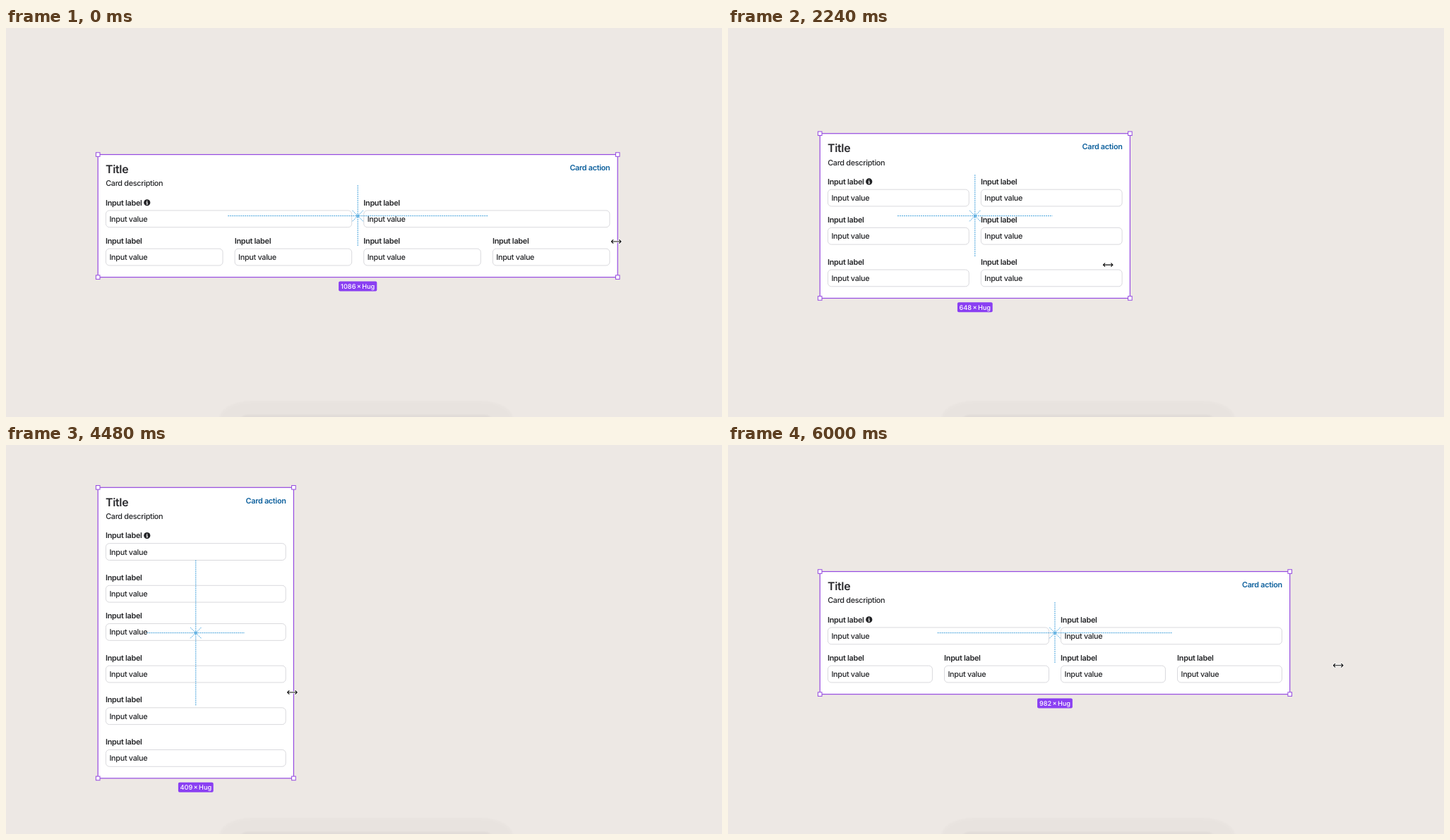
These frames come from a looping animation (1014x552 px, 6080 ms). An HTML page:

```html
<!DOCTYPE html>
<html lang="en">
<head>
<meta charset="utf-8">
<title>Responsive card resize</title>
<style>
  html, body { margin: 0; width: 100%; height: 100%; overflow: hidden; background: #ede8e4; }
  svg { display: block; width: 1014px; height: 552px; }
  text {
    font: 500 10.84px Inter, "Liberation Sans", sans-serif;
    letter-spacing: -.028em; fill: #242528;
    text-rendering: geometricPrecision;
  }
  .label { font-weight: 600; letter-spacing: -.026em; }
  .title { font-size: 15.9px; font-weight: 600; letter-spacing: -.022em; fill: #2a2a2e; }
  .action { font-weight: 600; letter-spacing: -.027em; text-anchor: end; fill: #0d609d; }
  .size { font-size: 9.2px; letter-spacing: 0; word-spacing: -.12em; text-anchor: middle; fill: #fff; }
  .input { fill: #fff; stroke: #d9d9dd; }
  .outline { fill: none; stroke: #9549e0; stroke-width: 1.2; }
  .handle { fill: #fff; stroke: #9549e0; }
  .guide { fill: none; stroke: #2f98d8; stroke-width: .9; stroke-dasharray: 2 1; }
  .arrow { fill: none; stroke-linejoin: round; stroke-linecap: round; }
</style>
</head>
<body>
<svg id="stage" viewBox="0 0 1014 552">
  <defs>
    <filter id="near" x="-10%" y="-50%" width="120%" height="200%"><feGaussianBlur stdDeviation="1.5"/></filter>
  </defs>
  <rect x="302" y="529" width="416" height="90" rx="46" ry="26" opacity=".014" filter="url(#near)"/>
  <rect x="330" y="549" width="360" height="60" rx="12" opacity=".03" filter="url(#near)"/>
</svg>
<script>
const LOOP = 6080, STEP = 80, LEAD = 110;
const WIDE = 1086, NARROW = 409;      // card widths in design units
const UNIT = 736 / WIDE;              // stage pixels per design unit
const LEFT = 130.2, MID_Y = 266.6;
const PAD = 16, GAP = 24, MIN_FIELD = 200;
const GROUPS = [2, 4];                // fields per group

// [time, card width] at the turning points of the drag
const DRAG = [[0, WIDE], [560, WIDE], [1360, 846], [2240, 648], [2480, 559], [3360, 454],
  [3760, NARROW], [4960, NARROW], [5520, 706], [6000, 982], [LOOP, WIDE]];

const stage = document.getElementById('stage');

function set(el, attrs) {
  for (const key in attrs) el.setAttribute(key, attrs[key]);
}

function add(parent, tag, attrs, text) {
  const el = document.createElementNS('http://www.w3.org/2000/svg', tag);
  set(el, attrs);
  if (text) el.textContent = text;
  return parent.appendChild(el);
}

function slope(i) {
  const [t0, w0] = DRAG[i], [t1, w1] = DRAG[i + 1];
  return (w1 - w0) / (t1 - t0);
}

function tangent(i) {
  if (i === 0) return 0;
  if (i === DRAG.length - 1) return slope(i - 1);
  const a = slope(i - 1), b = slope(i);
  return a * b <= 0 ? 0 : 2 * a * b / (a + b);
}

// Smooth curve through the drag points that never overshoots
function widthAt(t) {
  if (t >= LOOP) return WIDE;
  const i = DRAG.findIndex(([end]) => end > t) - 1;
  const [t0, w0] = DRAG[i], [t1, w1] = DRAG[i + 1];
  const span = t1 - t0, u = (t - t0) / span, r = 1 - u;
  return w0 * r * r * (1 + 2 * u) + w1 * u * u * (3 - 2 * u)
    + span * u * r * (tangent(i) * r - tangent(i + 1) * u);
}

const card = add(stage, 'g');
const paper = add(card, 'rect', { fill: '#fff' });
add(card, 'text', { class: 'title', x: 10.9, y: 26.5 }, 'Title');
add(card, 'text', { x: 11, y: 44.8 }, 'Card description');
const action = add(card, 'text', { class: 'action', y: 22.7 }, 'Card action');

const fields = Array.from({ length: 6 }, (_, i) => {
  const g = add(card, 'g');
  add(g, 'text', { class: 'label', y: -7.2 }, 'Input label');
  const box = add(g, 'rect', { class: 'input', x: .4, y: .2, height: 23.8, rx: 5 });
  add(g, 'text', { x: 5.4, y: 16.1 }, 'Input value');
  if (i === 0) {
    add(g, 'circle', { cx: 58.7, cy: -11, r: 4.6, fill: '#202124' });
    add(g, 'path', { d: 'M57.5 -11.4H58.9V-8.9M57.4 -8.8H60.1M58.7 -13.8V-12.6', fill: 'none', stroke: '#fff', 'stroke-width': 1.1 });
  }
  return { g, box };
});

const outline = add(card, 'rect', { class: 'outline' });
const axes = add(card, 'path', { class: 'guide' });
const star = add(card, 'g');
add(star, 'path', { class: 'guide', d: 'M-2 -2L-8 -8M2 -2L8 -8M-2 2L-8 8M2 2L8 8' });
add(star, 'rect', { x: -1.5, y: -1.5, width: 3, height: 3, fill: '#7bbce6', stroke: '#2f98d8', 'stroke-width': .6 });
const handles = [0, 1, 2, 3].map(() => add(card, 'rect', { class: 'handle', width: 5.6, height: 5.6 }));

const badge = add(card, 'g');
const badgeBox = add(badge, 'rect', { height: 14, rx: 2, fill: '#8a3ff2' });
const badgeText = add(badge, 'text', { class: 'size', y: 10.4 });

const cursor = add(stage, 'g');
const arrow = 'M-6.8 0H6.8M-4.4 -2.3L-6.8 0L-4.4 2.3M4.4 -2.3L6.8 0L4.4 2.3';
add(cursor, 'path', { class: 'arrow', d: arrow, stroke: '#fff', 'stroke-width': 2.8 });
add(cursor, 'path', { class: 'arrow', d: arrow, stroke: '#111', 'stroke-width': 1.1 });

const fits = (count, inner) => inner >= count * MIN_FIELD + (count - 1) * GAP;

// Wraps each group into as many columns as fit and returns the lower edge
function placeFields(inner) {
  let y = 79.2, n = 0;
  for (const count of GROUPS) {
    const cols = fits(4, inner) ? count : fits(2, inner) ? 2 : 1;
    const size = (inner - (cols - 1) * GAP) / cols;
    for (let k = 0; k < count; k++, n++) {
      const col = k % cols;
      if (n && !col) y += (k ? 88 : 80) * UNIT;
      set(fields[n].g, { transform: `translate(${(PAD + col * (size + GAP)) * UNIT} ${y})` });
      set(fields[n].box, { width: size * UNIT - .8 });
    }
    // A group stacked in one column keeps the wider gap inside
  }
  return y + 60 * UNIT;
}

function draw(t) {
  const units = widthAt(t), w = units * UNIT;
  const h = placeFields(units - 2 * PAD);

  set(card, { transform: `translate(${LEFT} ${MID_Y - h / 2})` });
  set(paper, { width: w, height: h });
  set(outline, { width: w, height: h });
  set(action, { x: w - PAD * UNIT });
  set(axes, { d: `M${w / 4} ${h / 2}H${w * .75}M${w / 2} ${h / 4}V${h * .75}` });
  set(star, { transform: `translate(${w / 2} ${h / 2})` });
  handles.forEach((el, i) => set(el, { x: (i % 2) * w - 2.8, y: (i >> 1) * h - 2.8 }));

  const value = Math.round(units), wide = value > 999 ? 54.2 : 49.8;
  set(badge, { transform: `translate(${w / 2} ${h + 5.9})` });
  set(badgeBox, { x: -wide / 2, width: wide });
  badgeText.textContent = `${value} × Hug`;

  // The pointer runs ahead of the edge and sinks as the card narrows
  const x = LEFT + widthAt(t + LEAD) * UNIT - 2;
  const y = 303 + 48 * ((WIDE - units) / (WIDE - NARROW)) ** .85;
  set(cursor, { transform: `translate(${x} ${y})` });
}

const start = performance.now();
function tick() {
  const t = (performance.now() - start) % LOOP;
  draw(Math.floor(t / STEP) * STEP);
  requestAnimationFrame(tick);
}
tick();
</script>
</body>
</html>
```
